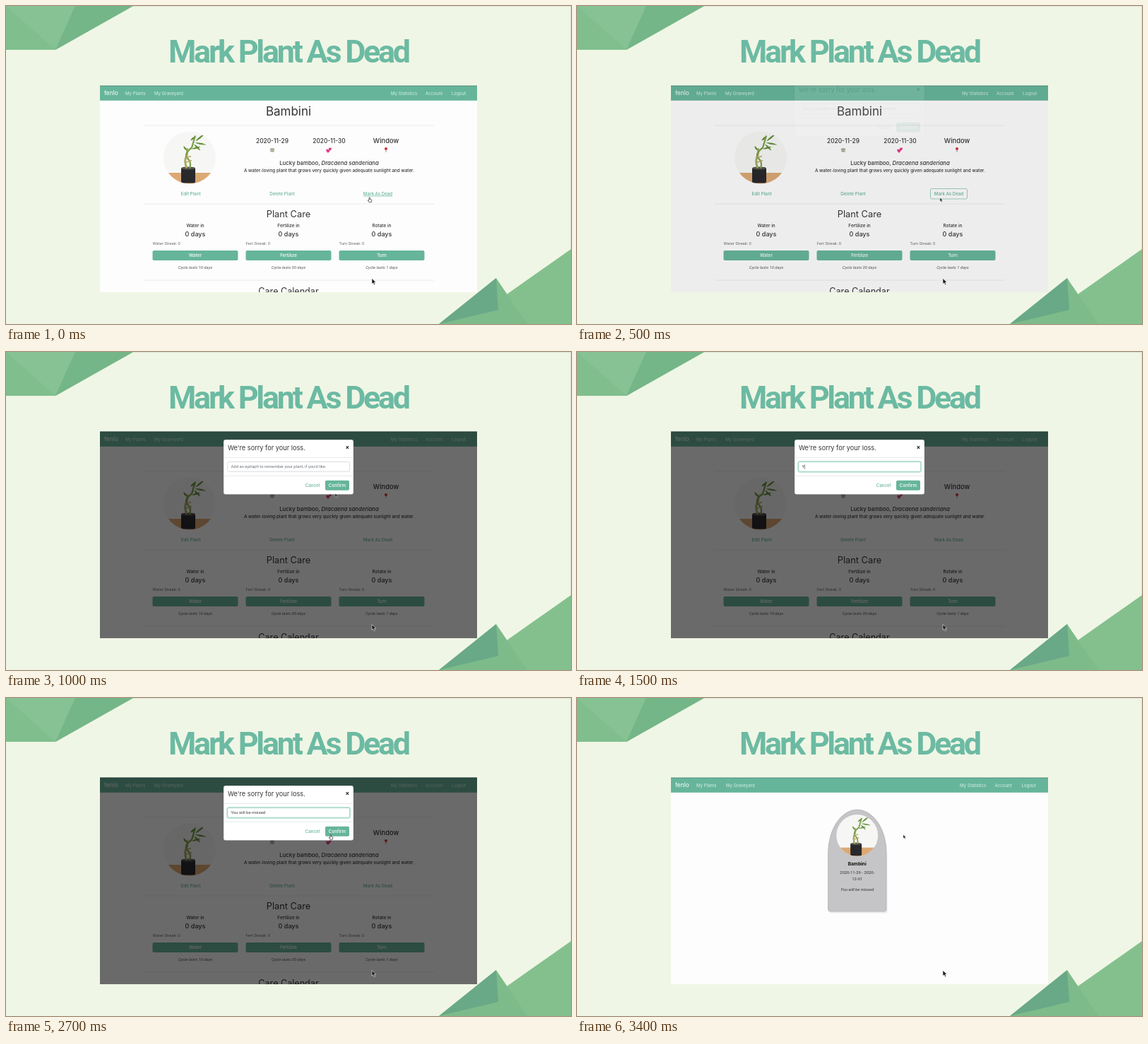
Write an HTML page that moves like this. It is 800 px wide and 450 px high and loops after 3600 ms.

```html
<!DOCTYPE html>
<html lang="en">
<head>
<meta charset="utf-8">
<title>Mark Plant As Dead</title>
<style>
  html, body { margin: 0; width: 100%; height: 100%; overflow: hidden; background: #f0f6e5; }
  svg { display: block; width: 100vw; height: 100vh; }
  text { font-family: Inter, "Open Sans", sans-serif; white-space: pre; }
  .body { font-family: Roboto, "Liberation Sans", sans-serif; }
  .mid { text-anchor: middle; }
  #title { font: 700 46px Roboto, "Liberation Sans", sans-serif; letter-spacing: -.073em; }
</style>
</head>
<body>
<svg id="stage" viewBox="0 0 800 450"></svg>
<script>
const LOOP = 3600, STEP = 100;
const GREEN = '#66b59b', INK = '#343436';
const EPITAPH = 'You will be missed';
const stage = document.getElementById('stage');
const clamp = v => Math.max(0, Math.min(1, v));

const text = (x, y, size, str, { fill = INK, weight = 400, cls = 'mid', extra = '' } = {}) =>
  `<text x="${x}" y="${y}" font-size="${size}" fill="${fill}" font-weight="${weight}" class="${cls}" ${extra}>${str}</text>`;
const rect = (x, y, w, h, fill, extra = '') =>
  `<rect x="${x}" y="${y}" width="${w}" height="${h}" fill="${fill}" ${extra}/>`;
const poly = (points, fill) => `<polygon points="${points}" fill="${fill}"/>`;
const path = (d, stroke, width = 1, extra = '') =>
  `<path d="${d}" fill="none" stroke="${stroke}" stroke-width="${width}" ${extra}/>`;
const rule = y => path(`M195 ${y}H606`, '#e6e6e8', .8);
const group = (id, content, extra = '') => `<g id="${id}" ${extra}>${content}</g>`;

const scenery =
  rect(0, 0, 800, 450, '#f0f6e5') + path('M0 .5H800M799.5 0V450', '#dfe5d6') +
  poly('0,0 180,0 70,62 0,62', '#80bf8d') +
  poly('0,0 98,0 70,62', '#86c293') +
  poly('98,0 180,0 70,62', '#74b688') +
  poly('709,408 800,344 800,450 736,450', '#84c08d') +
  poly('694,385 738,450 613,450', '#7dbb8a') +
  poly('694,385 697,430 613,450', '#69a987') +
  text(400, 79.5, 46, 'Mark Plant As Dead', { fill: '#6cbaa3', extra: 'id="title"' });

function nav(graveX, statsX, accountX, logoutX) {
  const items = [[169, 'My Plants'], [graveX, 'My Graveyard'], [statsX, 'My Statistics'], [accountX, 'Account'], [logoutX, 'Logout']];
  return rect(133, 112.4, 534, 21.4, GREEN) + rect(133, 112.4, 534, 1, '#4c7d6e') +
    text(139, 126, 8.4, 'fenlo', { fill: '#fff', cls: '' }) +
    items.map(([x, s]) => text(x, 125.5, 6.15, s, { fill: '#d8efe6', cls: '' })).join('');
}

function photo(x, y, radius) {
  const leaf = (lx, ly, angle, len) =>
    `<path transform="translate(${lx} ${ly}) rotate(${angle})" d="M0 0Q${len / 2} -3 ${len} 0Q${len / 2} 2.2 0 0" fill="#64913b"/>`;
  return `<g transform="translate(${x} ${y}) scale(${radius / 37})" clip-path="url(#disc)">` +
    rect(-37, -37, 74, 74, '#f6f7f5') + rect(-37, 21.5, 74, 16, '#dba974') +
    rect(-12, 14, 20, 22, '#29292c', 'rx="2.5"') +
    `<ellipse cx="-2" cy="15" rx="10" ry="2" fill="#55534c"/>` +
    path('M-4 15Q-8 6 -5 -1T-4 -13', '#a3aa62', 3) +
    path('M0 15Q3 7 -3 1T3 -14L8 -31', '#7fa04c', 2.3) +
    path('M-6 7L3 4M-5 0L2 -2', '#bba763', 1.6) +
    leaf(8, -30, 140, 9) + leaf(8, -23, -38, 16) + leaf(7, -21, 10, 17) +
    leaf(6, -19, 45, 13) + leaf(3, -12, -15, 13) + leaf(-4, -10, 235, 8) +
    '</g>';
}

const calendarIcon = `<circle cx="377" cy="204" r="3.3" fill="#cfcdbf"/>` +
  rect(374, 202, 6, 1.2, '#8b9681') + rect(375.2, 204.6, 3.6, 1.1, '#9b8478');
const heart = (x, y, s) =>
  `<path transform="translate(${x} ${y}) scale(${s})" d="M0 3C-5 -1 -2 -4 0 -1.5C2 -4 5 -1 0 3" fill="#e23a80"/>`;
const hearts = heart(456, 205, 1) + heart(459, 202.3, .75);
const pin = path('M538 203V207', '#8a8a8c', .9) + '<circle cx="538" cy="202" r="2.1" fill="#d9363b"/>';
const alien = '<ellipse cx="538" cy="203.8" rx="2.6" ry="3.2" fill="#9a9d9b"/>' +
  '<circle cx="536.8" cy="204" r=".9" fill="#18181a"/><circle cx="539.2" cy="204" r=".9" fill="#18181a"/>';

const profile = (third, size, icon) =>
  text(400, 155.3, 17, 'Bambini') + rule(169) + photo(260, 214.5, 37) +
  [[377, '2020-11-29', 8.4], [457.5, '2020-11-30', 8.4], [538, third, size]]
    .map(([x, s, fs]) => text(x, 194, fs, s, { weight: 500 })).join('') +
  calendarIcon + hearts + icon +
  text(457.5, 224.5, 7.8, 'Lucky bamboo, <tspan font-style="italic">Dracaena sanderiana</tspan>', { weight: 500 }) +
  text(457.5, 234.6, 6.35, 'A water-loving plant that grows very quickly given adequate sunlight and water.', { weight: 500 });

function careColumn(x, heading, streak, action, days) {
  const note = { fill: '#6d6d70', cls: 'body' };
  return text(x, 313.3, 6.4, heading, { weight: 500 }) +
    text(x, 326.3, 9, '0 days', { weight: 500 }) +
    text(x - 60.5, 337.6, 5.85, streak + ' Streak: 0', note) +
    rect(x - 60.5, 346, 121, 14, GREEN, 'rx="2"') +
    text(x, 355.2, 6.3, action, { fill: '#fff', weight: 500 }) +
    text(x, 372.3, 5.87, `Cycle lasts ${days} days`, { fill: '#555558', cls: 'body mid', extra: 'font-style="italic"' });
}

const link = { fill: GREEN, weight: 500 };
const livingPage = nav(210, 545, 594, 631) + profile('Window', 9.4, pin) +
  text(261.5, 267.7, 6.3, 'Edit Plant', link) + text(391, 267.7, 6.2, 'Delete Plant', link) +
  text(526.5, 267.7, 6.15, 'Mark As Dead', link) +
  path('M506 269H547', GREEN, .7, 'id="underline"') +
  rect(500.5, 258.5, 52, 14.5, 'none', `id="outline" rx="2" stroke="${GREEN}" stroke-opacity=".7" stroke-width=".9"`) +
  rule(280) + text(400, 299.3, 12.8, 'Plant Care') +
  careColumn(268, 'Water in', 'Water', 'Water', 10) +
  careColumn(400, 'Fertilize in', 'Fert', 'Fertilize', 30) +
  careColumn(532, 'Rotate in', 'Turn', 'Turn', 1) +
  rule(388) + text(400, 407.6, 12.6, 'Care Calendar');

function calendar() {
  const left = 201.7, col = 56.65;
  let out = rect(left + 2 * col, 343, col, 48, '#f6f4d9');
  ['Sun', 'Mon', 'Tue', 'Wed', 'Thu', 'Fri', 'Sat'].forEach((day, i) => {
    const x = left + i * col;
    const number = { fill: '#a9d0c1', cls: '', extra: 'text-anchor="end"' };
    out += text(x + col / 2, 341.2, 3.9, day, { fill: GREEN }) +
      text(x + col - 2, 349.6, 4, i < 2 ? 29 + i : i - 1, number) +
      text(x + col - 2, 397.6, 4, 6 + i, number);
  });
  let lines = `M${left} 336H598.3M${left} 343H598.3M${left} 391H598.3`;
  for (let i = 0; i < 8; i++) lines += `M${left + i * col} ${i % 7 ? 343 : 336}V405`;
  return out + path(lines, '#cbe3d7', .8);
}

const deadPage = nav(210, 545, 594, 631) + profile('2020-12-01', 8.4, alien) +
  text(400, 270, 12.8, 'Plant Care') +
  [[268, 'water every 10'], [400, 'fertilization every 30'], [532, 'rotation every 1']]
    .map(([x, s]) => text(x, 284.3, 6.2, `Required ${s} days`, { weight: 500 })).join('') +
  rule(296) + text(400, 315.3, 12.6, 'Care Calendar') +
  text(202, 328, 6.8, 'December 2020', { weight: 500, cls: '' }) +
  rect(559, 321, 15, 10, '#68706e', 'rx="1.5"') + text(566.5, 327.4, 4, 'today', { fill: '#e8eeec' }) +
  rect(576, 321, 22, 10, '#2b3536', 'rx="1.5"') +
  path('M582.6 324L580.9 326L582.6 328M591.5 324L593.2 326L591.5 328', '#fff', .9) + calendar();

const small = { cls: 'body mid' };
const gravePage = nav(211, 542, 591.5, 629.5) +
  '<path d="M355.5 220A41.2 62 0 0 1 438 220V300Q438 303.5 435 303.5H358.5Q355.5 303.5 355.5 300Z" fill="#ebeaec" transform="translate(1.5 1)"/>' +
  '<path d="M355.5 220A41.2 62 0 0 1 438 220V299Q438 302 435 302H358.5Q355.5 302 355.5 299Z" fill="#c5c4c6" stroke="#b3b2b4" stroke-width=".8"/>' +
  photo(396.7, 194.5, 29.5) +
  text(396.7, 237.2, 6.6, 'Bambini', { fill: '#111', weight: 700 }) +
  text(396.7, 249.2, 5.9, '2020-11-29 - 2020-', small) + text(396.7, 258.2, 5.9, '12-01', small) +
  text(396.7, 273.2, 5.85, EPITAPH, { ...small, extra: 'font-style="italic"' });

const modal =
  rect(308, 124, 184, 77.5, '#fff', 'rx="3" stroke="#555" stroke-opacity=".35" stroke-width=".6"') +
  text(314, 139.3, 9.2, "We're sorry for your loss.", { cls: '' }) +
  path('M481.6 133.2L485.2 136.8M485.2 133.2L481.6 136.8', '#2c2c2e', 1.2) +
  path('M308 149.3H492M308 175.3H492', '#e2e3e5', .8) +
  rect(313, 154.7, 174.5, 15.2, 'none', 'id="glow" rx="3" stroke="#cfeade" stroke-width="2"') +
  rect(313.7, 155.4, 173, 13.8, '#fff', 'id="field" rx="2" stroke-width=".8"') +
  text(318.5, 164.4, 5.9, '', { cls: 'body', extra: 'id="entry"' }) +
  path('', '#333', .6, 'id="caret"') +
  text(434, 190.7, 6.2, 'Cancel', link) +
  rect(452, 181.7, 34, 14, GREEN, 'rx="2"') +
  text(469, 190.8, 6.3, 'Confirm', { fill: '#fff', weight: 500 });

const arrow = (id, scale, extra = '') => group(id,
  `<path transform="scale(${scale})" d="M0 0V8.2L2 6.5L3.4 9.6L4.9 8.9L3.5 5.9H6.1Z" fill="#161618" stroke="#fff" stroke-width=".6"/>`, extra);
const hand = group('hand',
  '<path d="M-1 -2.8Q0 -3.7 .5 -2.5V-.4L2.4 .1Q3 .3 2.8 1.4L2.2 3.6H-1L-2.6 1Q-2.4 .2 -1 1Z" fill="#fff" stroke="#222" stroke-width=".7"/>');
const beam = group('beam', path('M-1.2 -3H1.2M0 -3V3M-1.2 3H1.2', '#333', .7));

stage.innerHTML =
  '<defs><clipPath id="disc"><circle r="37"/></clipPath><clipPath id="screen"><rect x="133" y="112.4" width="534" height="292.6"/></clipPath></defs>' +
  scenery +
  group('page', rect(133, 112, 534, 293, '#fefdfe') + group('living', livingPage) + group('dead', deadPage) + group('grave', gravePage) +
    rect(133, 112, 534, 293, '#030003', 'id="shade"') + group('modal', modal), 'clip-path="url(#screen)"') +
  hand + beam + arrow('arrow', .62) + arrow('rest', .95, 'transform="translate(518 385.5)"');

const el = id => document.getElementById(id);
const show = (id, on) => el(id).setAttribute('display', on ? 'inline' : 'none');

// Pick the type size at which the headline spans its column.
const title = el('title');
title.style.fontSize = Math.min(50, 46 * 340 / title.getComputedTextLength()) + 'px';

// time, x, y, shape taken from that time on
const pointer = [
  [0, 515, 274, 'hand'], [500, 514, 271.5, 'arrow'], [600, 515, 274, 'hand'], [700, 514, 271, 'arrow'],
  [1200, 440, 162, 'beam'], [1400, 440, 162, ''], [2500, 446, 168, 'beam'],
  [2600, 456, 188, 'hand'], [2700, 460, 196.5, 'hand'], [2800, 462, 193, 'beam'], [3100, 462, 193.5, 'arrow']
];

function drawPointer(t) {
  const i = pointer.findLastIndex(key => key[0] <= t);
  const [start, x, y, shape] = pointer[i];
  const next = pointer[i + 1] || pointer[i];
  const k = start === 700 ? (t - start) / (next[0] - start) : 0;
  const ease = k * k * (3 - 2 * k);
  for (const id of ['hand', 'beam', 'arrow']) show(id, id === shape);
  if (shape) el(shape).setAttribute('transform', `translate(${x + (next[1] - x) * ease} ${y + (next[2] - y) * ease})`);
}

function draw(time) {
  const t = Math.floor(time % LOOP / STEP) * STEP;
  show('living', t < 2800);
  show('dead', t >= 2800 && t < 3100);
  show('grave', t >= 3100);
  show('underline', t < 400);
  show('outline', t >= 400 && t < 600);

  const open = t >= 500 && t < 2800;
  const fade = open ? clamp((t - 488) / 112) : 0;
  const slide = 1 - clamp((t - 490) / 185);
  el('shade').setAttribute('opacity', .58 * fade);
  el('modal').setAttribute('opacity', fade);
  el('modal').setAttribute('transform', `translate(0 ${-19 * slide * slide})`);

  const focused = t >= 1300;
  const typed = EPITAPH.slice(0, t < 1500 ? 0 : Math.round(1 + (t - 1500) * .019));
  const entry = el('entry');
  entry.textContent = typed || "Add an epitaph to remember your plant, if you'd like.";
  entry.setAttribute('fill', typed ? '#3c3d40' : '#6b7075');
  show('glow', focused);
  el('field').setAttribute('stroke', focused ? '#85c9b2' : '#ced2d5');
  const caretX = 318.8 + (typed ? entry.getComputedTextLength() : 0);
  el('caret').setAttribute('d', `M${caretX} 159.4V165.6`);
  show('caret', focused && t < 2500);
  drawPointer(t);
}

const began = performance.now();
function tick() {
  draw(performance.now() - began);
  requestAnimationFrame(tick);
}
tick();
</script>
</body>
</html>
```
